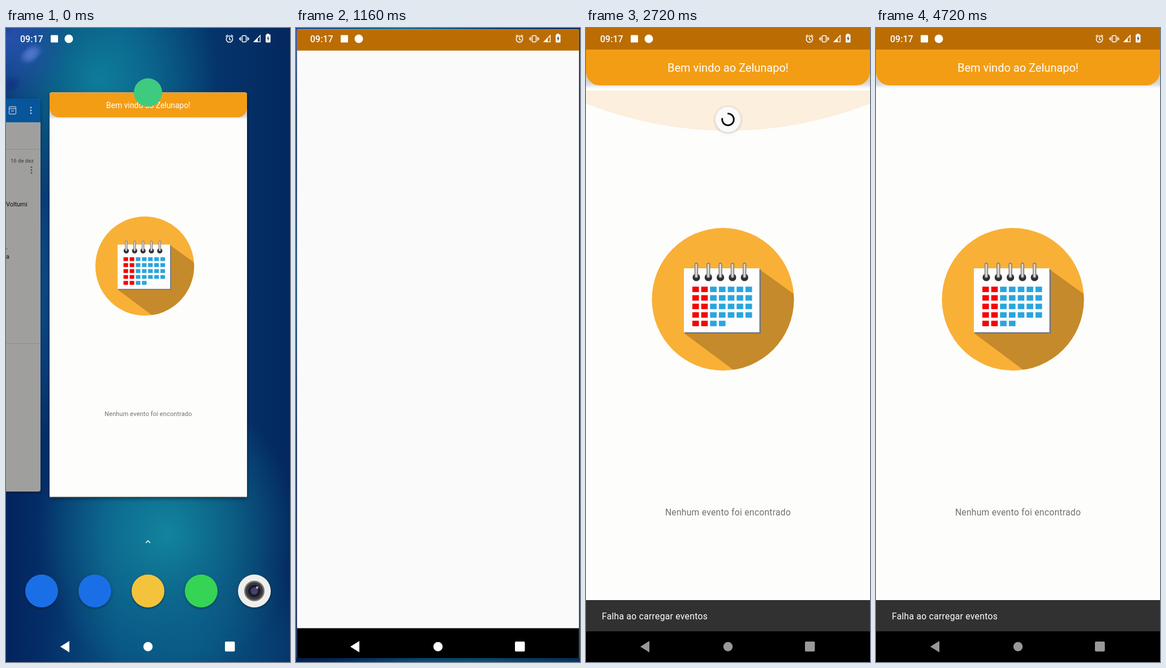
An HTML page with a canvas for the animation above (4.76 s loop, 502 px wide and 1116 px high).

```html
<!DOCTYPE html>
<html lang="pt">
<head>
<meta charset="utf-8">
<style>
html, body { margin: 0; height: 100%; overflow: hidden; background: #042a63; }
canvas { display: block; width: 502px; height: 1116px; }
</style>
</head>
<body>
<canvas id="stage" width="502" height="1116"></canvas>
<script>
const W = 502, H = 1116, LOOP = 4760, TAU = Math.PI * 2;
const FONT = 'Roboto, "Noto Sans", sans-serif';
const c = document.getElementById('stage').getContext('2d');

const clamp = v => Math.max(0, Math.min(1, v));
const mix = (a, b, k) => a + (b - a) * k;
const ramp = (t, start, length) => clamp((t - start) / length);

// cubic-bezier(.4, 0, .2, 1)
function ease(t, start, length) {
  const x = ramp(t, start, length);
  let lo = 0, hi = 1;
  for (let i = 0; i < 20; i++) {
    const u = (lo + hi) / 2, v = 1 - u;
    if (1.2 * u * v * v + 0.6 * u * u * v + u * u * u < x) lo = u; else hi = u;
  }
  return lo * lo * (3 - 2 * lo);
}

function rect(x, y, w, h, fill, radius = 0) {
  c.fillStyle = fill;
  c.beginPath();
  c.roundRect(x, y, w, h, radius);
  c.fill();
}

function disc(x, y, r, fill) {
  c.fillStyle = fill;
  c.beginPath();
  c.arc(x, y, r, 0, TAU);
  c.fill();
}

function trace(points) {
  c.beginPath();
  points.forEach(([x, y]) => c.lineTo(x, y));
}

function poly(points, fill) {
  trace(points);
  c.fillStyle = fill;
  c.fill();
}

function stroke(color, width) {
  c.strokeStyle = color;
  c.lineWidth = width;
  c.stroke();
}

function text(str, x, y, size, fill, { align = 'left', weight = 400, spacing = 0 } = {}) {
  c.font = `${weight} ${size}px ${FONT}`;
  c.textAlign = align;
  c.letterSpacing = spacing + 'px';
  c.fillStyle = fill;
  c.fillText(str, x, y);
}

function shadowed(blur, dy, draw) {
  c.save();
  c.shadowColor = 'rgba(0,0,0,.4)';
  c.shadowBlur = blur;
  c.shadowOffsetY = dy;
  draw();
  c.restore();
}

function faded(alpha, draw) {
  if (alpha <= 0) return;
  c.save();
  c.globalAlpha = alpha;
  draw();
  c.restore();
}

function blob(x, y, rx, ry, rgb, alpha) {
  c.save();
  c.translate(x, y);
  c.scale(rx, ry);
  const g = c.createRadialGradient(0, 0, 0, 0, 0, 1);
  g.addColorStop(0, `rgba(${rgb},${alpha})`);
  g.addColorStop(0.5, `rgba(${rgb},${alpha * 0.55})`);
  g.addColorStop(1, `rgba(${rgb},0)`);
  disc(0, 0, 1, g);
  c.restore();
}

function wallpaper() {
  const g = c.createLinearGradient(0, 0, W, 0);
  g.addColorStop(0, '#03235e');
  g.addColorStop(0.4, '#06447a');
  g.addColorStop(1, '#04285f');
  rect(0, 0, W, H, g);
  blob(165, 90, 210, 240, '16,135,160', 0.85);
  blob(20, 450, 110, 300, '20,105,165', 0.7);
  blob(285, 890, 230, 260, '20,145,165', 0.85);
  blob(330, 1090, 260, 170, '12,105,145', 0.6);
  // rocky moon in the corner
  blob(5, 20, 110, 125, '42,84,180', 0.9);
  for (let i = 0; i < 16; i++) {
    blob((i * 37) % 72, (i * 53) % 108, 16, 13, i % 2 ? '90,125,215' : '18,50,130', 0.3);
  }
}

function kebab(x, y, fill) {
  for (const dy of [-5, 0, 5]) disc(x, y + dy, 1.5, fill);
}

function mailCard() {
  shadowed(5, 2, () => rect(-20, 124, 81, 692, '#9f9f9d', 4));
  rect(-20, 124, 81, 42, '#07559a', [4, 4, 0, 0]);
  rect(0, 213, 61, 1, '#8e8e96');
  rect(0, 555, 61, 1, '#8e8e96');
  c.beginPath();
  c.roundRect(5.5, 138.5, 12, 13, 1.5);
  c.moveTo(5.5, 142);
  c.lineTo(17.5, 142);
  c.moveTo(9, 146);
  c.lineTo(14, 146);
  stroke('#a9bfd2', 1.4);
  kebab(44, 145, '#b5c8d8');
  text('16 de dez', 8, 237, 9.5, '#3c3c3c');
  kebab(45, 250, '#555');
  text('Voltumi', 0, 314, 11, '#111');
  text('.', 0, 389, 11, '#111');
  text('a', 0, 406, 11, '#111');
}

function dock() {
  c.lineCap = 'round';
  trace([[247.5, 906], [251, 902.5], [254.5, 906]]);
  stroke('#fff', 1.5);
  ['#1a6fe6', '#1a6fe6', '#f4c33c', '#35d455', '#efefed'].forEach((fill, i) =>
    shadowed(4, 1.5, () => disc(63 + i * 94, 991, 29, fill)));
  disc(439, 991, 18, '#77777a');
  disc(439, 991, 15.5, '#3a3a3e');
  disc(439, 991, 11, '#1b1a26');
  disc(439, 991, 6.5, '#454070');
  disc(444, 985, 2.3, '#a8a6c8');
}

function calendar() {
  const cx = 242, cy = 477.5, r = 125.5;
  disc(cx, cy, r, '#f9b036');
  c.save();
  c.beginPath();
  c.arc(cx, cy, r, 0, TAU);
  c.clip();
  poly([[307, 425], [367, 468], [400, 620], [285, 620], [173, 537]], '#c58a2b');
  c.restore();
  rect(175, 425, 134, 113, '#747780');
  rect(173, 423, 133.5, 112.5, '#fdfdfd');
  for (let i = 0; i < 5; i++) {
    const x = 195 + i * 21.3;
    disc(x, 439, 6.6, '#303030');
    rect(x - 3.2, 413, 6.4, 27, '#858585', 3.2);
    rect(x - 1.5, 415, 2.8, 24, '#dedede', 1.4);
  }
  for (let row = 0; row < 5; row++) {
    for (let col = 0; col < (row < 4 ? 7 : 4); col++) {
      rect(188 + col * 15.65, 455.3 + row * 15, 11.6, 9.6, col < 2 ? '#f40404' : '#29a5dd');
    }
  }
}

function systemBars() {
  rect(0, 0, W, 38, '#bb6d03');
  rect(0, 1062, W, 54, '#000');
}

function appPage() {
  rect(0, 0, W, H, '#fdfdfc');
  const g = c.createLinearGradient(0, 92, 0, 106);
  g.addColorStop(0, '#d2d2d4');
  g.addColorStop(0.5, '#dcdcde');
  g.addColorStop(1, '#fdfdfc');
  rect(0, 38, W, 68, g);
  rect(0, 38, W, 63, '#f39d15', [0, 0, 24, 24]);
  text('Bem vindo ao Zelunapo!', 251, 77, 20, '#fff', { align: 'center' });
  calendar();
  text('Nenhum evento foi encontrado', 251, 857.5, 15.65, '#707070', { align: 'center', spacing: 0.28 });
}

function statusIcons() {
  text('09:17', 25, 25, 16, '#fff', { weight: 500 });
  rect(79, 12.5, 13, 13, '#fff', 1);
  disc(111, 19, 7.5, '#fff');
  // alarm
  c.beginPath();
  c.arc(395, 19.5, 5.6, 0, TAU);
  c.moveTo(395, 16);
  c.lineTo(395, 20);
  c.lineTo(397.5, 21.5);
  c.moveTo(388.5, 15);
  c.lineTo(392, 12);
  c.moveTo(401.5, 15);
  c.lineTo(398, 12);
  stroke('#fff', 1.5);
  // vibration
  c.beginPath();
  c.roundRect(417.5, 13.5, 7, 11, 1);
  for (const [x, h] of [[415, 3.5], [413, 2], [427, 3.5], [429, 2]]) {
    c.moveTo(x, 19 - h);
    c.lineTo(x, 19 + h);
  }
  stroke('#fff', 1.4);
  // signal
  trace([[438.5, 24.3], [449.3, 13.2], [449.3, 24.3]]);
  c.closePath();
  stroke('#fff', 1.3);
  poly([[437.5, 25], [445, 17.5], [445, 25]], '#fff');
  // battery
  rect(461, 10, 4, 3, '#fff');
  rect(459, 11.5, 8.5, 14, '#fff', 1);
  poly([[464, 13.5], [461, 19.3], [463, 19.3], [462.5, 23.5], [465.7, 17.7], [463.8, 17.7]], '#444');
}

function navIcons(level) {
  const fill = `rgb(${level},${level},${level})`;
  poly([[96, 1089], [112, 1079], [112, 1099]], fill);
  disc(251, 1089, 8.2, fill);
  rect(387, 1080, 17.5, 17.5, fill, 2);
}

function launcher(t) {
  const p = ease(t, 890, 336);
  const scale = mix(349 / W, 1, p);
  const left = mix(77, 0, p), top = mix(113.5, 38, p);
  const clipTop = 38 * (1 - p), clipBottom = 1062 + 54 * p + 2 * (1 - p);
  const y = top + (clipTop - 38) * scale, h = (clipBottom - clipTop) * scale;

  wallpaper();
  c.save();
  c.translate(-77 * p, 0);
  mailCard();
  c.restore();
  faded(1 - p, dock);

  const radius = 4 * (1 - p);
  shadowed(6, 2, () => rect(left, y, W * scale, h, '#fafafa', radius));
  c.save();
  c.beginPath();
  c.roundRect(left, y, W * scale, h, radius);
  c.clip();
  c.translate(left, top - 38 * scale);
  c.scale(scale, scale);
  appPage();
  faded(ramp(t, 1020, 100), () => rect(0, 0, W, H, '#fafafa'));
  systemBars();
  c.restore();
  faded(1 - 3 * p, () => disc(251, 113.5, 25, '#3ecb80'));
}

function spinner(x, y, scale, angle, alpha) {
  c.save();
  c.translate(x, y);
  c.scale(scale, scale);
  c.save();
  c.shadowColor = 'rgba(0,0,0,.25)';
  c.shadowBlur = 5;
  c.shadowOffsetY = 1;
  disc(0, 0, 22.5, '#fafafa');
  c.restore();
  c.lineCap = 'butt';
  c.rotate(angle * TAU / 360);
  c.beginPath();
  c.arc(0, 0, 10.3, 0, TAU * 0.8);
  stroke(`rgba(0,0,0,${alpha})`, 2.8);
  c.restore();
}

const pulls = [
  { start: 2460, end: 3040, depth: 71, drop: 74, angle: 265 },
  { start: 3690, end: 4240, depth: 77, drop: 77, angle: 235 }
];

function pullRefresh(t, { start, end, depth, drop, angle }) {
  if (t < start || t > end + 450) return;
  const down = ease(t, start, 260);
  const glow = down * (1 - ease(t, end - 20, 400));
  const size = 1 - ramp(t, end, 150);
  c.save();
  c.beginPath();
  c.rect(0, 110, W, 952);
  c.clip();
  const d = depth * glow;
  c.beginPath();
  c.moveTo(0, 110);
  c.lineTo(0, 110 + d * 0.33);
  c.quadraticCurveTo(251, 110 + d * 1.67, W, 110 + d * 0.33);
  c.lineTo(W, 110);
  c.fillStyle = `rgba(248,160,40,${0.15 * glow})`;
  c.fill();
  if (size > 0) {
    spinner(251, 87 + drop * down, size, angle + (t - start - 260) * 0.4, mix(0.3, 1, ramp(down, 0.6, 0.3)));
  }
  c.restore();
}

function snackbar(t) {
  const shown = ease(t, 1335, 250) - ease(t, 3040, 200) + ease(t, 3240, 200)
    - ease(t, 4240, 220) + ease(t, 4470, 240);
  const y = 1062 - 55 * shown;
  rect(0, y, W, 55, '#313131');
  faded(ramp(shown, 0.4, 0.6), () =>
    text('Falha ao carregar eventos', 28, y + 33.5, 15.7, '#fff', { spacing: 0.28 }));
}

function app(t) {
  appPage();
  pulls.forEach(p => pullRefresh(t, p));
  snackbar(t);
  systemBars();
}

function frame() {
  const t = performance.now() % LOOP;
  c.clearRect(0, 0, W, H);
  if (t < 1320) launcher(t); else app(t);
  statusIcons();
  navIcons(Math.round(mix(255, 153, ramp(t, 1950, 400))));
  requestAnimationFrame(frame);
}
frame();
</script>
</body>
</html>
```
